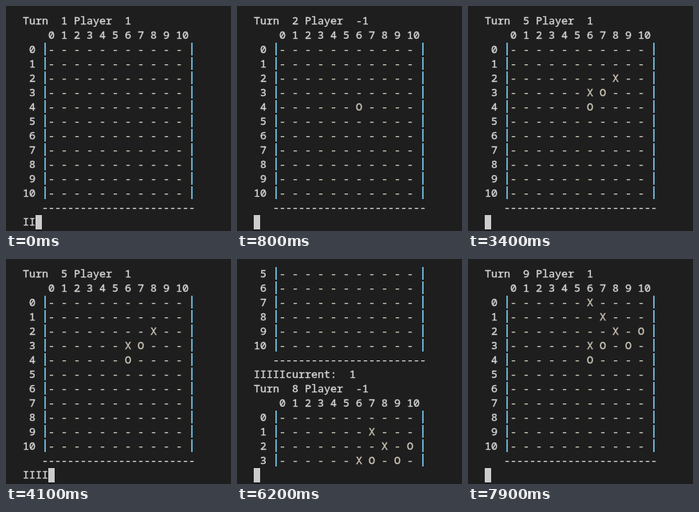
Recreate the animation shown at these times as an HTML page. Size 282 px wide and 282 px high, loop 8000 ms.

```html
<!DOCTYPE html>
<html lang="en">
<head>
<meta charset="utf-8">
<title>Board game in a terminal</title>
<style>
  html, body { margin: 0; width: 100%; height: 100%; overflow: hidden; background: #1e1e1e; }
  #term {
    position: absolute; left: 21px; top: 9px; margin: 0;
    font: 13.3333px/18px "Noto Sans Mono", "DejaVu Sans Mono", monospace;
    font-variant-ligatures: none;
    color: #d6d6d6; white-space: pre;
    -webkit-text-stroke: 0.35px currentColor;
  }
  #term div { height: 18px; }
  .cells { color: #d0c9b9; }
  .bar {
    display: inline-block; width: 8px; height: 18px; vertical-align: top;
    color: transparent;
    background: linear-gradient(#68a9c9, #68a9c9) 3px 1px / 2px 16px no-repeat;
  }
  #cursor { position: absolute; top: 262px; width: 8px; height: 18px; background: #cccccc; }
</style>
</head>
<body>
<div id="term"></div>
<div id="cursor"></div>
<script>
const LOOP = 8000, TICK = 100, LINE = 7;   // ms: loop, screen refresh, one printed line
const SIZE = 11, ROWS = 15, CELL = 8, LEFT = 21;
const term = document.getElementById('term');
const cursor = document.getElementById('cursor');

// at: when the board starts to print; marks: progress shown while thinking
const turns = [
  { at: -300, move: [4, 6], marks: 6 },
  { at: 600, move: [3, 6] },
  { at: 1600, move: [3, 7], marks: 8 },
  { at: 2400, move: [2, 8] },
  { at: 3300, move: [3, 9], marks: 5 },
  { at: 4400, move: [1, 7] },
  { at: 5300, move: [2, 10], marks: 5, wait: 600 },
  { at: 6155, move: [0, 6] },
  { at: 7200 }
];

const range = n => [...Array(n).keys()];
const player = i => i % 2 ? -1 : 1;
const bar = '<span class="bar">|</span>';

function board(i) {
  const grid = range(SIZE).map(() => Array(SIZE).fill('-'));
  turns.slice(0, i).forEach(({ move: [r, c] }, k) => grid[r][c] = k % 2 ? 'X' : 'O');
  return [
    `Turn  ${i + 1} Player  ${player(i)}`,
    '    ' + range(SIZE).join(' '),
    ...grid.map((row, r) =>
      `${String(r).padStart(2)} ${bar}<span class="cells">${row.join(' ')} </span>${bar}`),
    '   ' + '-'.repeat(24)
  ];
}

function marksAt(i, t) {
  const { at, marks = 0, wait = 0 } = turns[i];
  const end = i + 1 < turns.length ? turns[i + 1].at : LOOP;
  const p = (t - at - wait) / (end - at - wait);
  return Math.round(marks * Math.min(1, Math.max(0, p)));
}

function show(t) {
  const i = turns.filter(turn => turn.at + LINE <= t).length - 1;
  const marks = marksAt(i, t);
  const lines = board(i).slice(0, Math.floor((t - turns[i].at) / LINE));
  if (i > 0) {
    const prompt = 'I'.repeat(turns[i - 1].marks || 0);
    lines.unshift(...board(i - 1), `${prompt}current:  ${player(i - 1)}`);
  }
  lines.push('I'.repeat(marks));
  term.innerHTML = lines.slice(-ROWS).map(l => `<div>${l}</div>`).join('');
  cursor.style.left = LEFT + marks * CELL + 'px';
}

const begin = performance.now();
let last = -1;

function frame() {
  const t = Math.floor((performance.now() - begin) % LOOP / TICK) * TICK;
  if (t !== last) show(last = t);
  requestAnimationFrame(frame);
}
frame();
</script>
</body>
</html>
```
